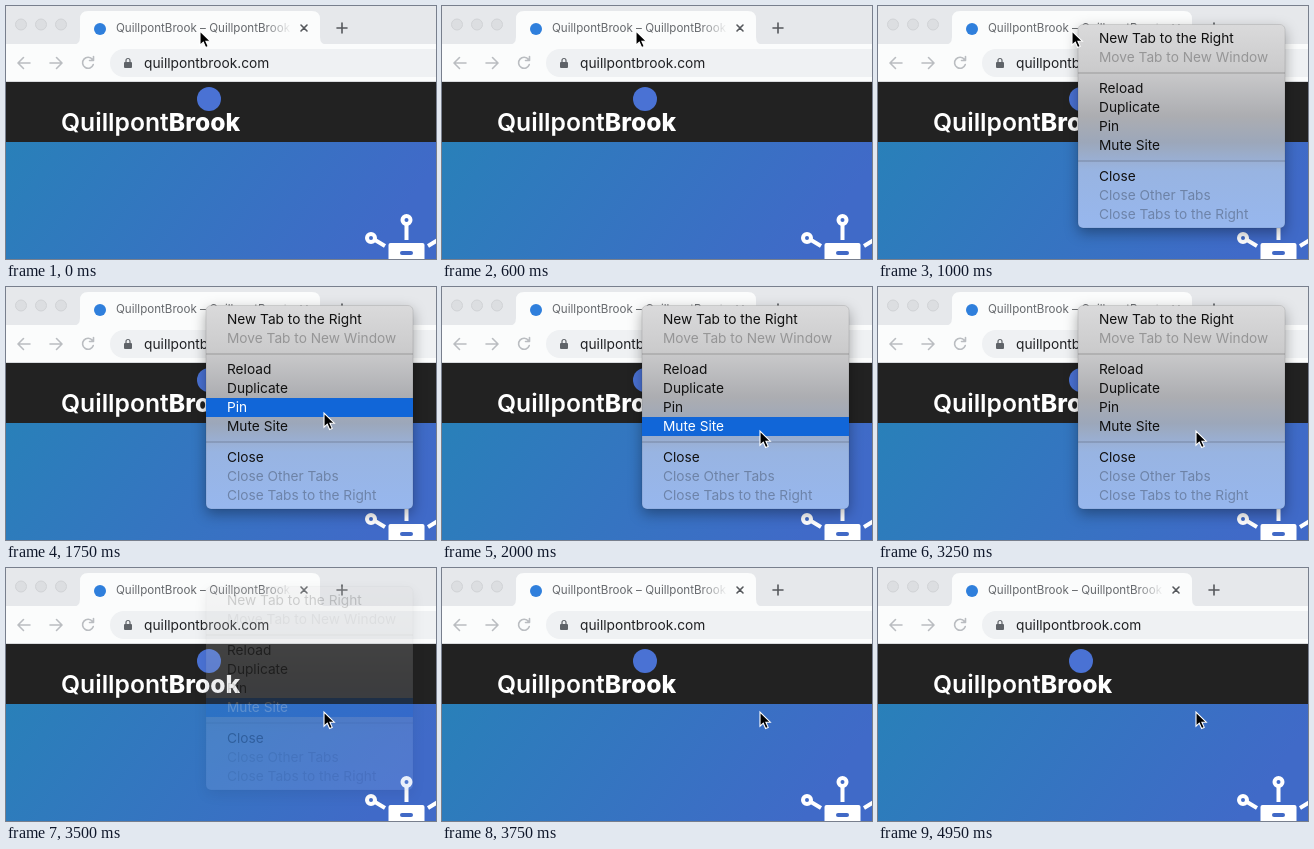
An HTML page that plays this animation: 430 by 253 pixels, repeating every 5750 ms.

```html
<!DOCTYPE html>
<html lang="en">
<head>
<meta charset="utf-8">
<title>Muting a site from the tab menu</title>
<style>
  html, body { margin: 0; width: 100%; height: 100%; overflow: hidden; }
  svg { display: block; width: 430px; height: 253px; font-family: Inter, sans-serif; }
  .line { fill: none; stroke-width: 1.6; stroke-linecap: round; stroke-linejoin: round; }
  #panel { filter: drop-shadow(0 5px 7px rgba(0, 0, 0, .34)); }
  #items { font-size: 13.7px; }
</style>
</head>
<body>
<svg viewBox="0 0 430 253">
  <defs>
    <linearGradient id="hero" x2="1" y2=".2">
      <stop stop-color="#2980b9"/><stop offset="1" stop-color="#406ac8"/>
    </linearGradient>
    <linearGradient id="fade">
      <stop stop-color="#fbfcfc" stop-opacity="0"/><stop offset="1" stop-color="#fbfcfc"/>
    </linearGradient>
    <linearGradient id="glass" x2="0" y2="1">
      <stop stop-color="#dadadb"/><stop offset=".22" stop-color="#cbcbcc"/>
      <stop offset=".45" stop-color="#acadb1"/><stop offset=".58" stop-color="#9ca7ba"/>
      <stop offset=".72" stop-color="#98b4e2"/><stop offset="1" stop-color="#97b7ee"/>
    </linearGradient>
    <clipPath id="tabClip"><rect x="106" y="5" width="179" height="33"/></clipPath>
  </defs>

  <!-- Browser window -->
  <rect width="430" height="39" fill="#e6e8eb"/>
  <g fill="#dcdee1" stroke="#d1d3d6">
    <circle cx="15" cy="18.500" r="5.500"/><circle cx="35" cy="18.500" r="5.500"/><circle cx="55" cy="18.500" r="5.500"/>
  </g>
  <path d="M66 39q8 0 8-8V13q0-8 8-8H306q8 0 8 8V31q0 8 8 8z" fill="#fbfcfc"/>
  <rect y="38" width="430" height="38" fill="#fbfcfc"/>
  <rect y="75" width="430" height="1" fill="#d9dbde"/>
  <circle cx="94" cy="23" r="6" fill="#2f7fdc"/>
  <g clip-path="url(#tabClip)">
    <text x="110" y="26" font-size="11.6" fill="#66696d">QuillpontBrook – QuillpontBrook</text>
  </g>
  <rect x="258" y="8" width="28" height="28" fill="url(#fade)"/>
  <path class="line" stroke="#55585c" d="M295 19l6 6m0-6l-6 6M331 22h10M336 17v10"/>
  <path class="line" stroke="#babdc1" d="M24 57H12.500m5-5.500l-5.500 5.500 5.500 5.500M44 57h11.500m-5-5.500l5.500 5.500-5.500 5.500M86.500 53.500a5.500 5.500 0 1 0 .8 5M87.500 50.500v4h-4"/>
  <path d="M430 43H118a14 14 0 0 0 0 28H430z" fill="#eff1f3"/>
  <rect x="118" y="56" width="8" height="6" rx="1" fill="#5f6368"/>
  <path class="line" stroke="#5f6368" style="stroke-width: 1.200" d="M120 56v-1.500a2 2 0 0 1 4 0V56"/>
  <text x="138" y="62" font-size="13.750" fill="#202124">quillpontbrook.com</text>

  <!-- Page -->
  <rect y="76" width="430" height="60" fill="#222"/>
  <circle cx="203" cy="93" r="12" fill="#4a72d4"/>
  <text x="55" y="125" font-size="24.700" font-weight="600" fill="#fff">Quillpont<tspan font-weight="800">Brook</tspan></text>
  <rect y="136" width="430" height="117" fill="url(#hero)"/>
  <g fill="none" stroke="#fff" stroke-width="4">
    <circle cx="400.500" cy="214" r="4"/><circle cx="365" cy="232" r="4"/>
    <path d="M400.500 218v16M369 234l10 6M422 240l10-6"/>
  </g>
  <rect x="382.500" y="237" width="36" height="20" rx="2" fill="#fff"/>
  <rect x="394" y="245" width="13" height="4" rx="2" fill="#4169c6"/>

  <!-- Context menu -->
  <g id="menu">
    <rect id="panel" x="200" y="18.500" width="207" height="203.500" rx="5" fill="url(#glass)" stroke="#000" stroke-opacity=".18" stroke-width=".6"/>
    <path d="M200 67h207M200 155h207" stroke="#000" stroke-opacity=".16" stroke-width="1.500"/>
    <rect id="highlight" x="200" width="207" height="19" fill="#1166d8"/>
    <g id="items"></g>
  </g>
  <path id="cursor" d="M0 0V14.200l3.300-3 2.300 5.300 2.600-1.100-2.300-5.200H10.300z" fill="#000" stroke="#fff" stroke-width="1.100"/>
</svg>
<script>
const $ = id => document.getElementById(id);
const LOOP = 5750;
const PIN = 120, MUTE = 139;

// Label, vertical centre, disabled
const items = [
  ["New Tab to the Right", 32], ["Move Tab to New Window", 51, true],
  ["Reload", 82], ["Duplicate", 101], ["Pin", PIN], ["Mute Site", MUTE],
  ["Close", 170], ["Close Other Tabs", 189, true], ["Close Tabs to the Right", 208, true],
].map(([label, y, disabled]) => {
  const el = document.createElementNS("http://www.w3.org/2000/svg", "text");
  el.textContent = label;
  el.setAttribute("x", 221);
  el.setAttribute("y", y + 5);
  $("items").append(el);
  return { el, y, color: disabled ? "rgba(0,0,0,.28)" : "#111" };
});

const onTab = [194, 25], onPin = [318, 126], onMute = [318, 144];
const steps = [
  { at: 0, cursor: onTab, opacity: 0 },
  { at: 1000, cursor: onTab, opacity: 1 },
  { at: 1750, cursor: onPin, opacity: 1, selected: PIN },
  { at: 2000, cursor: onMute, opacity: 1, selected: MUTE },
  { at: 3250, cursor: onMute, opacity: 1 },
  { at: 3500, cursor: onMute, opacity: .2, selected: MUTE },
  { at: 3750, cursor: onMute, opacity: 0 },
];

function draw(now) {
  const time = now % LOOP;
  const { cursor, opacity, selected } = steps.findLast(step => step.at <= time);
  $("menu").setAttribute("opacity", opacity);
  $("cursor").setAttribute("transform", `translate(${cursor})`);
  $("highlight").setAttribute("y", (selected ?? 0) - 9);
  $("highlight").setAttribute("visibility", selected ? "visible" : "hidden");
  for (const { el, y, color } of items) el.setAttribute("fill", y === selected ? "#fff" : color);
}

const start = performance.now();
function tick() {
  draw(performance.now() - start);
  requestAnimationFrame(tick);
}
tick();
</script>
</body>
</html>
```
